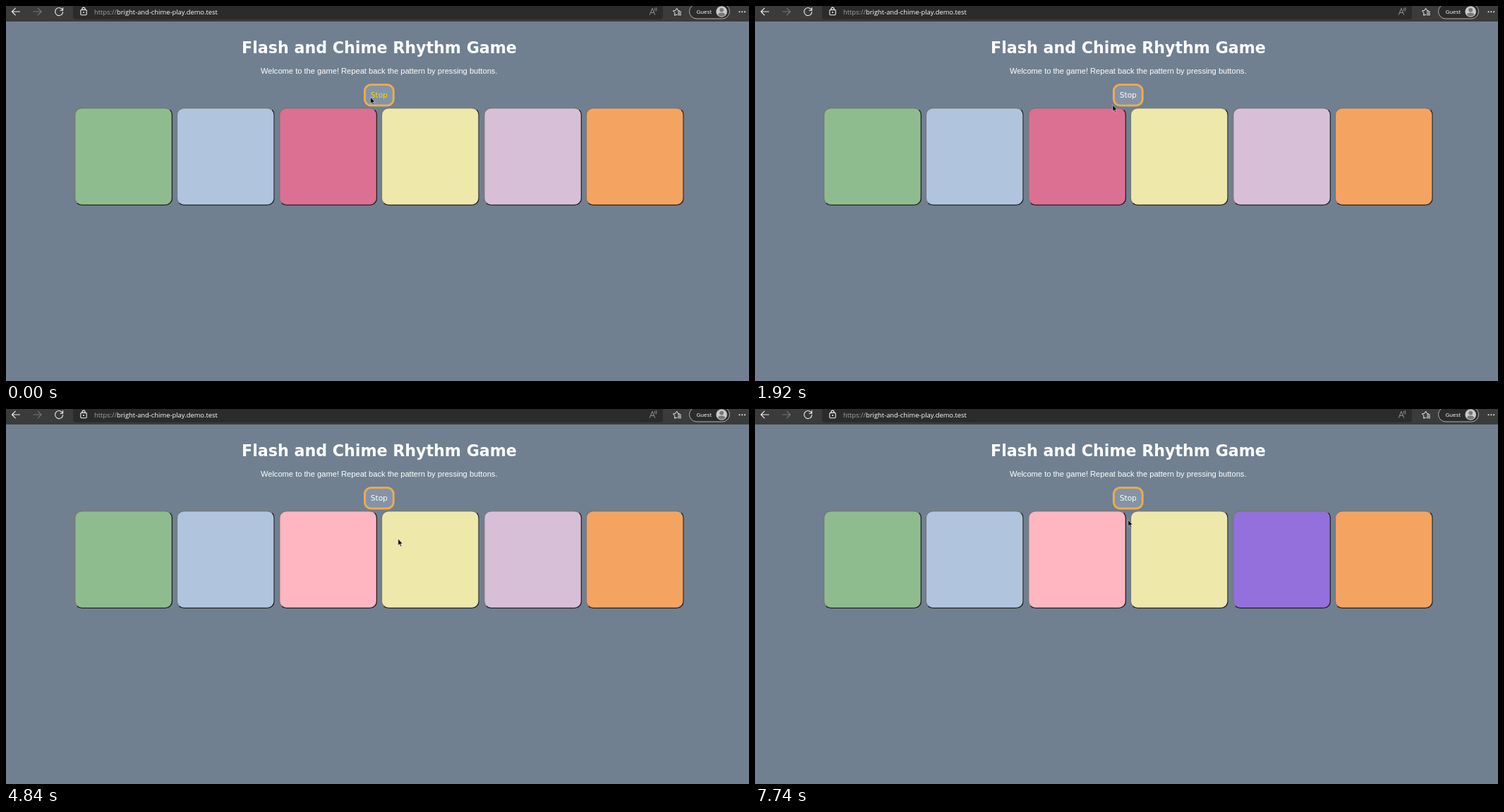
An HTML page that plays this animation: 1053x532 px, repeating every 8000 ms.

```html
<!DOCTYPE html>
<html lang="en">
<head>
<meta charset="utf-8">
<title>Memory game</title>
<style>
  html, body { margin: 0; width: 100%; height: 100%; overflow: hidden; background: #708090; }
  svg { position: absolute; left: 0; top: 0; display: block; }
  #tiles {
    position: absolute; left: 97.1px; top: 143.8px;
    transform: scale(.6955); transform-origin: 0 0;
  }
  .tile {
    position: absolute; top: 0; width: 200px; height: 200px; box-sizing: border-box;
    border: 2px solid; border-color: #767676 #212121 #212121 #767676; border-radius: 15px;
  }
  .tile.pressed { border-color: #212121 #767676 #767676 #212121; }
  .ui { font-family: "Open Sans", "Noto Sans", sans-serif; }
  .wide { font-family: "DejaVu Sans", sans-serif; text-anchor: middle; }
  .body { font-family: "Liberation Sans", Arial, sans-serif; text-anchor: middle; }
  .line { fill: none; stroke: #f2f2f2; stroke-width: 1.1; stroke-linecap: round; stroke-linejoin: round; }
</style>
</head>
<body>
<svg width="1053" height="532" viewBox="0 0 1053 532">
  <rect width="1053" height="22" fill="#3b3b3b"/>
  <rect x="95" y="-6" width="836" height="25" rx="4" fill="#2b2b2b"/>

  <!-- toolbar icons -->
  <path class="line" d="M19.5 8H8.5M13.3 3.2L8.5 8l4.8 4.8"/>
  <path class="line" style="stroke:#777" d="M39 8h11M45.2 3.2L50 8l-4.8 4.8"/>
  <path class="line" d="M80.3 6.2A5.5 5.5 0 1 0 80.6 8.6M80.6 2.6v3.7h-3.7"/>
  <g class="line">
    <rect x="105.8" y="5.4" width="8.4" height="7.4" rx="1.2"/>
    <path d="M107.9 5.2V4.2a2.1 2.1 0 0 1 4.2 0v1"/>
    <circle cx="110" cy="9" r=".5"/>
  </g>
  <g class="line" style="stroke:#a0a0a0;stroke-width:.9">
    <path d="M912.3 12.4L916 3.4l3.7 9M913.6 9.4h4.8M919.3 3.2q1.4 1.3 0 3M921.2 2.2q2.2 2.1 0 5"/>
  </g>
  <path class="line" style="stroke-width:1" d="M951 12.2l-3.4 1 .4-3.6-2.6-2.6 3.5-.7 1.7-3.2 1.7 3.2 2.2.4M952.4 8.2h4.2M952.4 10.4h4.2M952.4 12.6h4.2"/>
  <rect x="968.5" y="-2.5" width="57" height="20.5" rx="10.2" fill="#2b2b2b" stroke="#b0b0b0"/>
  <circle cx="1014.2" cy="8" r="7.8" fill="#c9c9c9"/>
  <circle cx="1014.2" cy="5.6" r="2.9" fill="#777"/>
  <path d="M1009 12.8q.4-3.3 5.2-3.3t5.2 3.3q-5.2 3.7-10.4 0z" fill="#777"/>
  <g fill="#f2f2f2">
    <circle cx="1039.5" cy="8.3" r="1"/><circle cx="1043.3" cy="8.3" r="1"/><circle cx="1047.1" cy="8.3" r="1"/>
  </g>

  <text class="ui" x="125" y="11.5" font-size="9.4" fill="#a3a3a3">https://<tspan fill="#fff">bright-and-chime-play.demo.test</tspan></text>
  <text class="ui" x="978.5" y="11" font-size="7.9" fill="#fff">Guest</text>

  <text class="wide" x="529" y="66.7" font-size="22.17" font-weight="700" fill="#fff">Flash and Chime Rhythm Game</text>
  <text class="body" x="528.7" y="96" font-size="11.13" fill="#fff">Welcome to the game! Repeat back the pattern by pressing buttons.</text>
  <rect x="508.4" y="111.6" width="40.8" height="29.6" rx="9" fill="#8494a6" stroke="#f0ad4e" stroke-width="2.8"/>
  <text id="stop" class="wide" x="528.8" y="130.2" font-size="10.6">Stop</text>
</svg>

<div id="tiles"></div>

<svg width="1053" height="532" viewBox="0 0 1053 532">
  <path id="cursor" d="M.3.3V9.4L2.3 7.6 3.8 11 5.2 10.4 3.7 7.1H6.4Z" fill="#000" stroke="#fff" stroke-width=".5"/>
</svg>

<script>
const LOOP = 8000, PITCH = 208.4;
const PINK = 2, YELLOW = 3, PURPLE = 4;

// resting colour, lit colour
const colours = [
  ['#8fbc8f', '#2e8b57'], ['#b0c4de', '#4682b4'], ['#ffb6c1', '#db7093'],
  ['#eee8aa', '#bdb76b'], ['#d8bfd8', '#9370db'], ['#f4a460', '#d2691e']
];

// start time, lit tile (or null), tile held down
const lights = [
  [0, PINK], [550, null], [820, PINK, true], [940, null],
  [1920, PINK], [2760, null], [3040, YELLOW], [3880, null],
  [4300, PINK, true], [4420, null], [4690, YELLOW, true], [4840, null],
  [5820, PINK], [6470, null], [6750, YELLOW], [7460, null], [7740, PURPLE]
];

// start time, pointer x, pointer y
const moves = [
  [0, 516.3, 129], [280, 511, 145], [400, 509, 153], [670, 506, 163.3],
  [1220, 506.2, 153], [1370, 506.6, 147], [1490, 506.7, 140],
  [3880, 506.7, 148], [4030, 506.6, 162], [4180, 506.6, 179],
  [4540, 555.5, 184], [4960, 540, 169], [5080, 528.6, 157]
];

const byId = id => document.getElementById(id);
const stop = byId('stop'), cursor = byId('cursor');

const tiles = colours.map((_, i) => {
  const tile = document.createElement('div');
  tile.className = 'tile';
  tile.style.left = i * PITCH + 'px';
  byId('tiles').append(tile);
  return tile;
});

const stepAt = (steps, t) => steps.filter(s => s[0] <= t).pop();

function draw(t) {
  const [, lit, held] = stepAt(lights, t);
  const [, x, y] = stepAt(moves, t);
  tiles.forEach((tile, i) => {
    const on = i === lit;
    tile.style.backgroundColor = colours[i][on ? 1 : 0];
    tile.classList.toggle('pressed', on && !!held);
  });
  const hover = x > 507 && x < 550 && y > 110 && y < 142;
  stop.setAttribute('fill', hover ? '#ffd700' : '#fff');
  cursor.setAttribute('transform', `translate(${x} ${y})`);
}

const start = performance.now();
function tick() {
  draw((performance.now() - start) % LOOP);
  requestAnimationFrame(tick);
}
tick();
</script>
</body>
</html>
```
